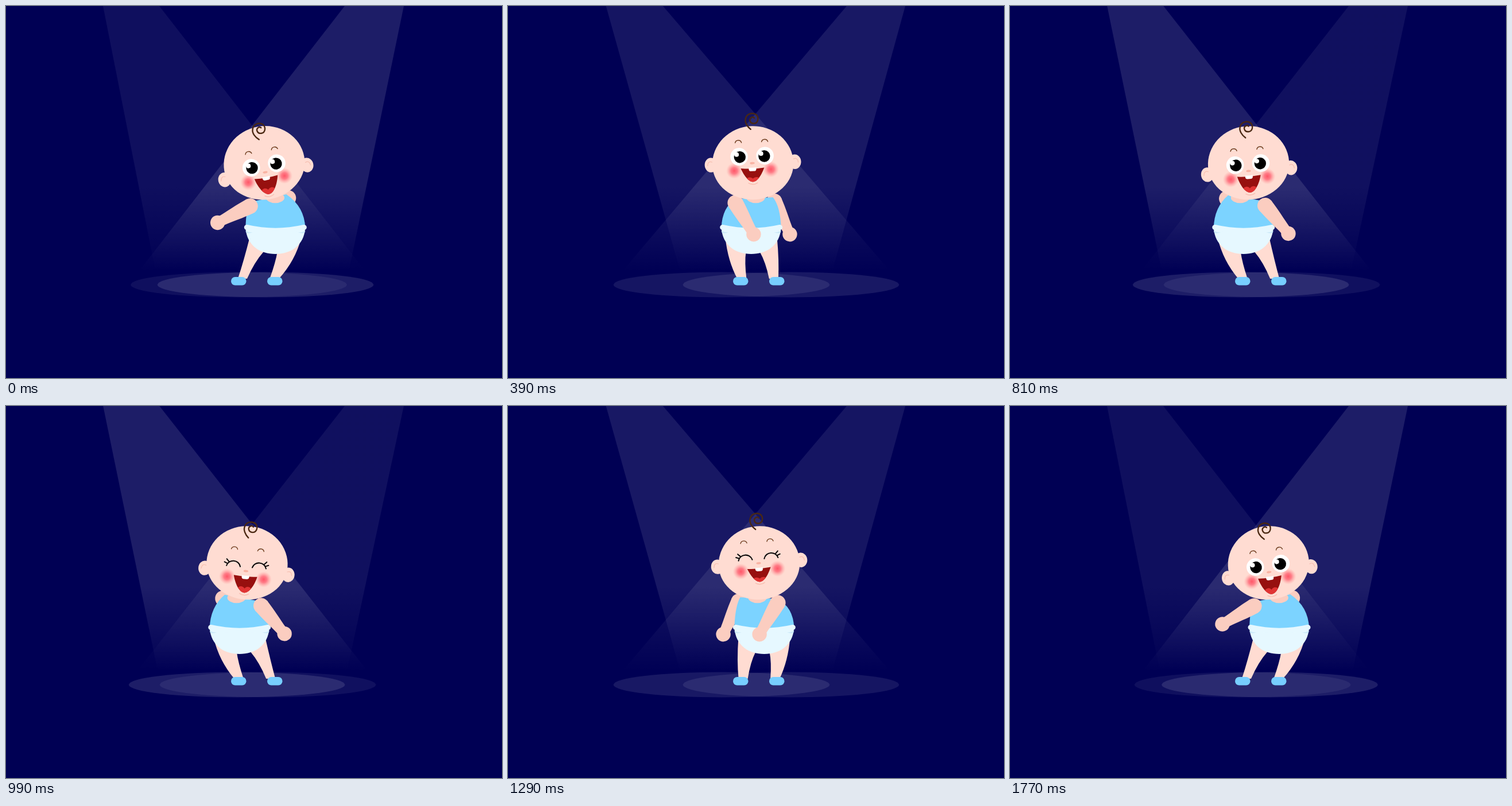
Write an HTML page with a canvas that moves like this. It is 864 px wide and 648 px high and loops after 1.8 s.

```html
<!DOCTYPE html>
<html>
<head>
<meta charset="utf-8">
<style>
html, body { margin: 0; height: 100%; overflow: hidden; background: #000054; }
canvas { display: block; }
</style>
</head>
<body>
<canvas id="stage" width="864" height="648"></canvas>
<script>
const ctx = document.getElementById('stage').getContext('2d');
const LOOP = 1800, HALF = 900, TAU = Math.PI * 2, DEG = Math.PI / 180;
const SKIN = '#ffdcd2', LIMB = '#fbcdc0', SHIRT = '#7cd3ff', SHOE = '#77ceff',
      DIAPER = '#e6f8ff', BROWN = '#4a2812';

const sine = p => (1 - Math.cos(Math.PI * p)) / 2;
const sharp = p => p < .5 ? .5 * (2 * p) ** 2.75 : 1 - .5 * (2 - 2 * p) ** 2.75;

// Eased keys over one half loop; the other half repeats them, times `sign`.
function track(t, times, values, sign = -1, ease = sine) {
  const n = times.length;
  const key = i => {
    const half = Math.floor(i / n), j = i - half * n;
    return [times[j] + half * HALF, values[j] * (half % 2 ? sign : 1)];
  };
  let i = -n;
  while (key(i + 1)[0] <= t) i++;
  const [t0, a] = key(i), [t1, b] = key(i + 1);
  return a + (b - a) * ease((t - t0) / (t1 - t0));
}

const BEATS = [0, 300, 600];
const sway = (t, values) => track(t, BEATS, values, -1, sharp);

// Arm angles from straight down, one per beat; the right arm mirrors the left half a loop later.
const ARM = [-63, 50, -46, 50, -45, 51];
function leftArm(t) {
  const p = (t % LOOP) / 300, i = Math.floor(p);
  return ARM[i] + (ARM[(i + 1) % 6] - ARM[i]) * sine(p - i);
}
const rightArm = t => -leftArm(t + HALF);

function fill(d, color) {
  ctx.fillStyle = color;
  ctx.fill(new Path2D(d));
}
function line(d, color, width) {
  ctx.strokeStyle = color;
  ctx.lineWidth = width;
  ctx.stroke(new Path2D(d));
}
function oval(x, y, rx, ry, color) {
  ctx.fillStyle = color;
  ctx.beginPath();
  ctx.ellipse(x, y, rx, ry, 0, 0, TAU);
  ctx.fill();
}
function at(x, y, angle, draw) {
  ctx.save();
  ctx.translate(x, y);
  ctx.rotate(angle * DEG);
  draw();
  ctx.restore();
}

function beam(x0, x1, floorX, alpha) {
  const g = ctx.createLinearGradient(0, 315, 0, 462);
  g.addColorStop(0, `rgba(255,255,255,${alpha})`);
  g.addColorStop(1, 'rgba(255,255,255,0)');
  fill(`M${x0},0H${x1}L${floorX + 188},480H${floorX - 188}Z`, g);
}

function lights(t) {
  const k = (1 - Math.cos(TAU * t / HALF)) / 2;
  const swing = .0275 * Math.cos(TAU * t / LOOP);
  const leftAlpha = .0875 - swing, rightAlpha = .0875 + swing;
  const a = 405.5 - 35 * k, b = 452 + 42.8 * k;
  beam(169 + 1.8 * k, 267 + 3 * k, b, leftAlpha);
  beam(590, 693 - k, a, rightAlpha);
  oval(a, 485.5, 188.3, 22, `rgba(255,255,255,${leftAlpha})`);
  oval(b, 485.5, 188.3, 22, `rgba(255,255,255,${rightAlpha})`);
}

function arm(x, y, angle) {
  at(x, y, -angle, () => {
    oval(0, 0, 13.5, 13.5, LIMB);
    fill('M-13.5,0C-13,20 -10,40 -9,56H9C10,40 13,20 13.5,0Z', LIMB);
    oval(0, 63.5, 12.7, 12.7, LIMB);
  });
}

function legs(hip) {
  const d = hip - 435;
  for (const s of [-1, 1]) {
    const ankle = (s < 0 ? 408.5 : 464) + .1 * d;
    const out = hip + s * 45, inn = hip + s * 12 - .25 * d;
    const outEnd = ankle + s * 8, inEnd = ankle - s * 8;
    fill(`M${out},404Q${out * .65 + outEnd * .35 + s * 3},444 ${outEnd},475H${inEnd}` +
         `Q${inn * .55 + inEnd * .45 + s * 3},446 ${inn},428L${hip},410Z`, SKIN);
    ctx.fillStyle = SHOE;
    ctx.beginPath();
    ctx.roundRect(s < 0 ? 392 : 455, 472, 26.5, 14.5, 7.2);
    ctx.fill();
  }
}

function diaper(hip) {
  at(hip, 0, 0, () => {
    fill('M-52,386C-50,418 -26,432 0,432C26,432 50,418 52,386Q0,395 -52,386Z', DIAPER);
    line('M-50,385.5Q0,397 50,385.5', DIAPER, 9);
    for (const s of [-1, 1])
      fill(`M${s * 52},391Q${s * 47},395 ${s * 39},394Q${s * 46},397 ${s * 51},395Z`, '#c9e8f8');
  });
}

function shirt(hip, l, r) {
  fill(`M${hip - 52},387Q${hip - 51},350 ${l[0]},${l[1]}L${r[0]},${r[1]}` +
       `Q${hip + 51},350 ${hip + 52},387Q${hip},394 ${hip - 52},387Z`, SHIRT);
}

function eye(s, mood) {
  at(s * 22.5, 0, 0, () => {
    if (mood === 'happy') {
      line('M-12,5C-9,-7 9,-7 12,5', '#0a0a0a', 2.1);
      line(`M${s * 11},1L${s * 16},-1M${s * 8.5},-2.5L${s * 12.5},-6.5`, '#0a0a0a', 2);
      return;
    }
    if (mood === 'smug') {
      ctx.beginPath();
      ctx.rect(-20, -2, 40, 24);
      ctx.clip();
    }
    oval(0, 0, 15.3, 15.3, '#fff');
    oval(-s * 1.2, .6, 10.2, 10.2, '#000');
    if (mood === 'open') oval(-s * 1.2 - 5.5, -4, 4, 4, '#fff');
  });
}

function face(mood, nod) {
  for (const s of [-1, 1]) {
    const x = s * 32, blush = ctx.createRadialGradient(x, 24, 0, x, 24, 14);
    blush.addColorStop(0, 'rgba(255,72,92,.9)');
    blush.addColorStop(.4, 'rgba(255,84,104,.7)');
    blush.addColorStop(1, 'rgba(255,150,150,0)');
    oval(x, 24, 14, 14, blush);
    eye(s, mood);
    const b = s * 23;
    line(`M${b - 5.5},-24.5C${b - 4},-30 ${b + 4},-30 ${b + 5.5},-24.5`, '#6b3a1c', 1.4);
  }
  oval(0, 12, 4.2, 1.9, '#f9b3a3');

  const low = 44.5 + 6 * nod;
  const mouth = `M-20.5,20.5Q0,23 20.5,20.5C18,${low - 18} 10,${low} 0,${low}C-10,${low} -18,${low - 18} -20.5,20.5Z`;
  fill(mouth, '#97100f');
  ctx.save();
  ctx.clip(new Path2D(mouth));
  for (const s of [-1, 1]) oval(s * 6, low - 1, 8, 7 + 3 * nod, '#e03434');
  ctx.restore();
  fill('M-6.5,19.5Q0,20.5 6.5,19.5V23Q6,26 3,26H-3Q-6,26 -6.5,23Z', '#fff');
  line(`M-8,${low + 2}Q0,${low + 7} 8,${low + 2}`, '#f6b9ab', 1.2);
}

function head(x, tilt, nod, mood) {
  const drop = 16 * nod;
  at(x, 273.2, tilt, () => {
    for (const s of [-1, 1]) {
      oval(s * 73, 1 + drop, 11, 12.7, SKIN);
      line(`M${s * 71},${-4 + drop}Q${s * 78},${-7 + drop} ${s * 79},${2 + drop}`, '#f6bfb1', 1.2);
    }
    ctx.fillStyle = SKIN;
    ctx.beginPath();
    ctx.ellipse(0, 2, 70.7, 66, 0, Math.PI, TAU);
    ctx.ellipse(0, 2, 70.7, 62, 0, 0, Math.PI);
    ctx.fill();
    at(-1, -11.5 + drop, 0, () => face(mood, nod));
    at(-1.5, -58.5 + 17 * nod, 0, () =>
      line('M0,0C-6,-5 -10,-13 -8,-19C-6,-28 5,-30 11,-25C16,-19 13,-10 6,-10' +
           'C-1,-10 -3,-18 2,-20.5C4,-21.5 6,-21 7,-19.5', BROWN, 2.4));
  });
}

function baby(t) {
  const hip = 435 + sway(t, [34.3, -15, 14.8]);
  const chest = 433 + sway(t, [25.5, -4, 3.5]);
  const neck = 433 + sway(t, [36, -1, -5]);
  const lean = sway(t, [-12, -2, -3.5]) * DEG;
  const headX = 432 + track(t, [-30, 330, 540], [18, -6.5, -1]);
  const tilt = -3.5 + track(t, [60, 360, 660], [-8.5, 1.5, -11]);
  const nod = track(t, [0, 390, 540], [1, 0, 0], 1);
  const mood = t >= 840 && t < 1400 ? 'happy' : t >= 1400 && t < 1680 ? 'smug' : 'open';

  const spot = (x, y) => [
    chest + x * Math.cos(lean) - y * Math.sin(lean),
    341.5 + x * Math.sin(lean) + y * Math.cos(lean)
  ];
  const left = () => arm(...spot(-34, 0), leftArm(t));
  const right = () => arm(...spot(34, 0), rightArm(t));
  const rightInFront = t >= 450 && t < 1350;

  (rightInFront ? left : right)();
  legs(hip);
  shirt(hip, spot(-32, -7), spot(32, -7));
  oval(neck, 334, 16, 9.2, LIMB);
  diaper(hip);
  (rightInFront ? right : left)();
  head(headX, tilt, nod, mood);
}

function frame() {
  const t = Math.floor(performance.now() % LOOP / 30) * 30;
  ctx.fillStyle = '#000054';
  ctx.fillRect(0, 0, 864, 648);
  ctx.lineCap = 'round';
  lights(t);
  baby(t);
  requestAnimationFrame(frame);
}
frame();
</script>
</body>
</html>
```
